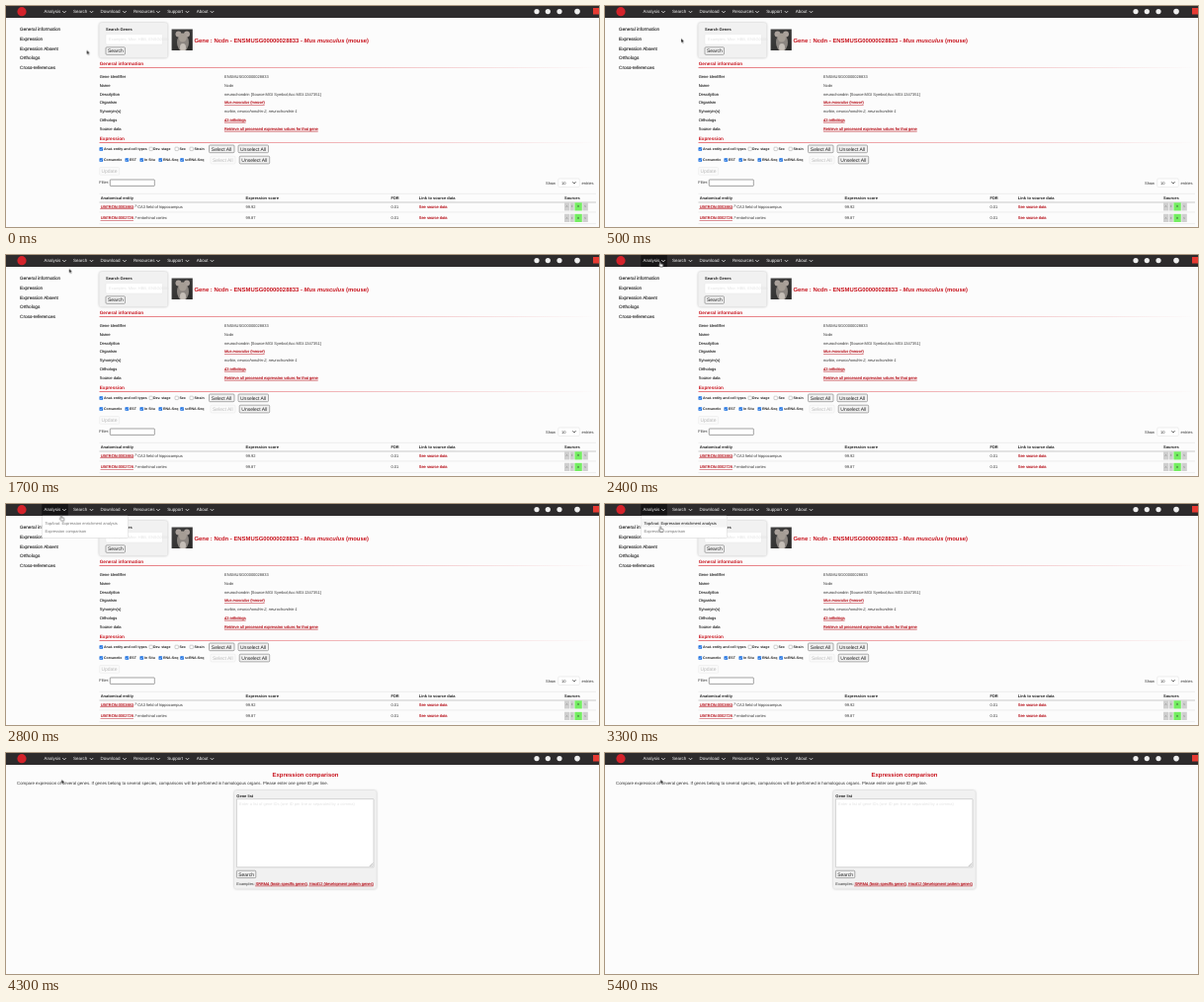
Recreate the animation shown at these times as an HTML page. Size 600x224 px, loop 6000 ms.

```html
<!DOCTYPE html>
<html lang="en">
<head>
<meta charset="utf-8">
<title>Gene page to expression comparison</title>
<style>
html, body { margin: 0; width: 100%; height: 100%; overflow: hidden; background: #fcfcfc; }
svg { display: block; width: 100%; height: 100%; }
text { font: 4px "Liberation Sans", Arial, sans-serif; fill: #333; text-rendering: geometricPrecision; white-space: pre; }
.nav text { font-size: 4.5px; fill: #f2f2f2; }
.side text { font-size: 4.7px; fill: #222; stroke: #222; stroke-width: .1; }
.label text { font-size: 4.05px; fill: #222; stroke: #222; stroke-width: .08; }
.bold, .checks text { font-weight: bold; fill: #222; }
.checks text { font-size: 3.55px; }
.title { font-size: 5.9px; font-weight: bold; fill: #c8141e; }
.head { font-size: 4.7px; font-weight: bold; fill: #c8141e; }
.link { font-size: 3.95px; fill: #b5101a; stroke: #b5101a; stroke-width: .12; }
.under { text-decoration: underline .5px; text-underline-offset: .3px; }
.italic { font-style: italic; }
.btn { font-size: 5px; fill: #222; }
.off { fill: #bbb; }
.hint { fill: #e2e2e2; }
.line { stroke: #ddd; stroke-width: .5; }
.box { fill: #f1f1f1; stroke: #777; stroke-width: .6; }
.pale { fill: #fafafa; stroke: #e6e6e6; stroke-width: .5; }
.field { fill: #fff; stroke: #888; stroke-width: .5; }
.panel { fill: #f1f1f1; filter: drop-shadow(0 .5px 1.3px #0004); }
.chev { fill: none; stroke: #f2f2f2; stroke-width: .8; }
.tiny { font-size: 3px; fill: #888; }

.gene, .compare, .menu, .arrow, .hand, .item, .row { animation: 6s step-end infinite; }
.gene { animation-name: gene; }
.compare { animation-name: compare; }
.menu { animation-name: menu; }
.arrow { animation-name: arrow; }
.hand { animation-name: hand; }
.item { fill: #777; }
.row { fill: #f4f4f4; }
.item.first { animation-name: first; }
.item.second { animation-name: second; }
.row.first { animation-name: row1; }
.row.second { animation-name: row2; }
.cursor { animation: move 6s infinite; }
@keyframes gene { 0% { opacity: 1 } 71.66%, 100% { opacity: 0 } }
@keyframes compare { 0% { opacity: 0 } 71.66%, 100% { opacity: 1 } }
@keyframes menu { 0% { opacity: 0 } 43.32% { opacity: 1 } 71.66%, 100% { opacity: 0 } }
@keyframes arrow { 0% { opacity: 1 } 33.32% { opacity: 0 } 71.66%, 100% { opacity: 1 } }
@keyframes hand { 0% { opacity: 0 } 33.32% { opacity: 1 } 71.66%, 100% { opacity: 0 } }
@keyframes first { 0% { fill: #777 } 48.32% { fill: #111 } 61.66%, 100% { fill: #777 } }
@keyframes second { 0% { fill: #777 } 61.66%, 100% { fill: #111 } }
@keyframes row1 { 0% { opacity: 0 } 48.32% { opacity: 1 } 61.66%, 100% { opacity: 0 } }
@keyframes row2 { 0% { opacity: 0 } 61.66%, 100% { opacity: 1 } }
@keyframes move {
  0% { transform: translate(81.6px, 44.6px); animation-timing-function: steps(10) }
  16.66% { transform: translate(72.2px, 20.8px); animation-timing-function: steps(14) }
  39.99% { transform: translate(55.3px, 6.6px); animation-timing-function: steps(2) }
  43.32% { transform: translate(55.3px, 7px); animation-timing-function: steps(7) }
  54.99% { transform: translate(55.6px, 22.8px); animation-timing-function: steps(9) }
  69.99%, 100% { transform: translate(56.2px, 26.8px) }
}
</style>
</head>
<body>
<svg viewBox="0 0 600 224">
<defs>
  <path id="chev" class="chev" d="M-1.7-.9 0 .8 1.7-.9"/>
  <g id="on"><rect width="3.6" height="3.6" rx=".6" fill="#1a6fe0"/><path d="M.8 1.8l.8.8L2.9 1" fill="none" stroke="#fff" stroke-width=".5"/></g>
  <rect id="empty" width="3.4" height="3.4" rx=".6" fill="#fff" stroke="#888" stroke-width=".4"/>
  <path id="out" d="M0 2.6 2.4.2M.9.2H2.4V1.7" fill="none" stroke="#777" stroke-width=".45"/>
  <g id="cells">
    <path d="M0 0h5v8.2H0zM5.6 0h4.2v8.2H5.6zM18.4 0h5.4v8.2h-5.4z" fill="#cfcfcf"/>
    <rect x="10.4" width="7.4" height="8.2" fill="#74ee62"/>
    <text class="tiny" x="1.5" y="5.1">A</text>
    <text class="tiny" x="6.7" y="5.1">E</text>
    <text class="tiny" x="13" y="5.1" style="fill:#333">R</text>
    <text class="tiny" x="20.1" y="5.1">S</text>
  </g>
  <linearGradient id="fade"><stop stop-color="#dc3a42"/><stop offset="1" stop-color="#fcfcfc"/></linearGradient>
  <linearGradient id="fur" x2="1" y2="1"><stop stop-color="#444"/><stop offset="1" stop-color="#292827"/></linearGradient>
  <clipPath id="frame"><rect x="167.6" y="23.5" width="21.2" height="21.4"/></clipPath>
</defs>

<rect width="600" height="224" fill="#fcfcfc"/>

<g class="gene">
  <g class="side">
    <text x="14" y="24.8">General information</text>
    <text x="14" y="34.6">Expression</text>
    <text x="14" y="44.5">Expression Absent</text>
    <text x="14" y="54.2">Orthologs</text>
    <text x="14" y="63.9">Cross-references</text>
  </g>

  <rect class="panel" x="94.3" y="17" width="69.2" height="35.5" rx="2.5"/>
  <text class="bold" x="101" y="25.4">Search Genes</text>
  <rect x="101" y="28.5" width="57.5" height="10.5" rx="1" fill="#fff" stroke="#e4e4e4" stroke-width=".5"/>
  <text class="hint" x="104" y="35.2">Examples: Mtor, HBB, ENSG0000</text>
  <rect class="box" x="101" y="41.8" width="19.5" height="7.5" rx="1"/>
  <text class="btn" x="103" y="47.3">Search</text>

  <g clip-path="url(#frame)">
    <rect x="167" y="23" width="22" height="22" fill="url(#fur)"/>
    <ellipse cx="179" cy="37" rx="6" ry="9" fill="#8b8580"/>
    <circle cx="174.5" cy="28.5" r="3" fill="#aaa19b"/>
    <circle cx="183" cy="28.5" r="3" fill="#aaa19b"/>
    <ellipse cx="178.8" cy="32" rx="4" ry="4.5" fill="#a59d95"/>
    <ellipse cx="179" cy="42" rx="3" ry="4" fill="#c5beb7"/>
  </g>
  <text class="title" x="190.5" y="37.3">Gene : Ncdn - ENSMUSG00000028833 - <tspan class="italic">Mus musculus</tspan> (mouse)</text>

  <text class="head" x="94.7" y="60.4">General information</text>
  <rect x="94.5" y="62.3" width="502.5" height=".7" fill="url(#fade)"/>
  <g class="label">
    <text x="94.7" y="73.4">Gene identifier</text>
    <text x="94.7" y="82">Name</text>
    <text x="94.7" y="90.6">Description</text>
    <text x="94.7" y="99.2">Organism</text>
    <text x="94.7" y="108">Synonym(s)</text>
    <text x="94.7" y="116.9">Orthologs</text>
    <text x="94.7" y="125.9">Source data</text>
  </g>
  <text x="221" y="73.4">ENSMUSG00000028833</text>
  <text x="221" y="82">Ncdn</text>
  <text x="221" y="90.6">neurochondrin [Source:MGI Symbol;Acc:MGI:1347351]</text>
  <text class="link under" x="221" y="99.2"><tspan class="italic">Mus musculus</tspan> (mouse)</text>
  <text class="italic" x="221" y="108">norbin, neurochondrin-2, neurochondrin-1</text>
  <text class="link under" x="221" y="116.9">43 orthologs</text>
  <text class="link under" x="221" y="125.9">Retrieve all processed expression values for that gene</text>

  <text class="head" x="94.7" y="136.2">Expression</text>
  <rect x="94.5" y="138" width="502.5" height=".7" fill="url(#fade)"/>
  <g class="checks">
    <use href="#on" x="94.5" y="143.2"/><text x="99" y="146.2">Anat. entity and cell types</text>
    <use href="#empty" x="145" y="143.2"/><text x="149" y="146.2">Dev. stage</text>
    <use href="#empty" x="171" y="143.2"/><text x="175.5" y="146.2">Sex</text>
    <use href="#empty" x="186" y="143.2"/><text x="190.5" y="146.2">Strain</text>
    <use href="#on" x="94.5" y="154.2"/><text x="99" y="157.3">Corvanetix</text>
    <use href="#on" x="120.5" y="154.2"/><text x="125" y="157.3">EST</text>
    <use href="#on" x="135.5" y="154.2"/><text x="140" y="157.3">In Situ</text>
    <use href="#on" x="154.5" y="154.2"/><text x="159" y="157.3">RNA-Seq</text>
    <use href="#on" x="176.3" y="154.2"/><text x="181" y="157.3">scRNA-Seq</text>
  </g>
  <rect class="box" x="205.5" y="141" width="25.5" height="7.7" rx="1"/>
  <text class="btn" x="207.8" y="146.6">Select All</text>
  <rect class="box" x="235" y="141" width="30.5" height="7.7" rx="1"/>
  <text class="btn" x="237" y="146.6">Unselect All</text>
  <rect class="pale" x="207" y="152.2" width="25" height="7.7" rx="1"/>
  <text class="btn off" x="209" y="157.8">Select All</text>
  <rect class="box" x="236.2" y="152.2" width="30.5" height="7.7" rx="1"/>
  <text class="btn" x="238.3" y="157.8">Unselect All</text>
  <rect class="pale" x="94.7" y="163.6" width="20" height="7.7" rx="1"/>
  <text class="btn off" x="96.4" y="169.2">Update</text>

  <text x="94.2" y="180.3">Filter:</text>
  <rect class="field" x="105.3" y="176" width="45" height="6.4" rx=".5" style="stroke:#444"/>
  <text x="546" y="180.6">Show</text>
  <rect class="field" x="558.8" y="175" width="21.5" height="8.4" rx="1" style="stroke:#ddd"/>
  <text x="562" y="180.8">10</text>
  <use href="#chev" x="575" y="179.2" style="filter:invert(.8)"/>
  <text x="582.5" y="180.6">entries</text>

  <path class="line" d="M94.5 190.3H597M94.5 208.9H597M94.5 220.7H597"/>
  <path d="M94.5 199H597" stroke="#999" stroke-width=".5"/>
  <text class="bold" x="95.7" y="196">Anatomical entity</text>
  <text class="bold" x="242.5" y="196">Expression score</text>
  <text class="bold" x="389.5" y="196">FDR</text>
  <text class="bold" x="417.8" y="196">Link to source data</text>
  <text class="bold" x="565" y="196">Sources</text>
  <text class="link under" x="95.7" y="204.6">UBERON:0003883</text>
  <use href="#out" x="129.6" y="201.6"/><text x="133.2" y="204.6">CA3 field of hippocampus</text>
  <text x="242.5" y="204.6">99.92</text><text x="389.5" y="204.6">0.01</text>
  <text class="link" x="417.8" y="204.6">See source data</text>
  <use href="#cells" x="565" y="199.3"/>
  <text class="link under" x="95.7" y="216.4">UBERON:0002728</text>
  <use href="#out" x="129.6" y="213.4"/><text x="133.2" y="216.4">entorhinal cortex</text>
  <text x="242.5" y="216.4">99.87</text><text x="389.5" y="216.4">0.01</text>
  <text class="link" x="417.8" y="216.4">See source data</text>
  <use href="#cells" x="565" y="210.8"/>
</g>

<g class="compare">
  <text class="title" x="303" y="23.6" text-anchor="middle">Expression comparison</text>
  <text x="11" y="32.4" style="font-size:4.35px">Compare expression of several genes. If genes belong to several species, comparisons will be performed in homologous organs. Please enter one gene ID per line.</text>
  <rect class="panel" x="231" y="38" width="143.8" height="99.8" rx="2"/>
  <text class="bold" x="233.3" y="44.7">Gene list</text>
  <rect class="field" x="233.4" y="46.6" width="138.6" height="69.2" rx=".5" style="stroke:#aaa"/>
  <path d="M367.8 115l3.4-3.4M369.6 115l1.6-1.6" stroke="#777" stroke-width=".5"/>
  <text class="hint" x="236" y="53.4">Enter a list of gene IDs (one ID per line or separated by a comma)</text>
  <rect class="box" x="233.4" y="119.2" width="19.4" height="7.4" rx="1"/>
  <text class="btn" x="235.2" y="124.7">Search</text>
  <text x="233.3" y="133.7" style="font-size:3.95px">Examples: <tspan class="link under" x="252.5">SRRM4 (brain specific genes)</tspan>, <tspan class="link under" x="306.8">Hoxd12 (development pattern genes)</tspan></text>
</g>

<g class="nav">
  <rect width="600" height="12" fill="#2d2b2c"/>
  <rect class="hand" x="36.3" width="26.5" height="12" fill="#161516"/>
  <circle cx="16" cy="5.7" r="4.6" fill="#d3222a"/>
  <text x="38.5" y="7.3">Analysis</text><use href="#chev" x="59" y="6"/>
  <text x="68" y="7.3">Search</text><use href="#chev" x="86.5" y="6"/>
  <text x="95.5" y="7.3">Download</text><use href="#chev" x="120" y="6"/>
  <text x="129" y="7.3">Resources</text><use href="#chev" x="154" y="6"/>
  <text x="163.3" y="7.3">Support</text><use href="#chev" x="183.5" y="6"/>
  <text x="192.8" y="7.3">About</text><use href="#chev" x="208.5" y="6"/>
  <g fill="#eee">
    <circle cx="537" cy="5.6" r="2.6"/><circle cx="548.3" cy="5.6" r="2.6"/>
    <circle cx="560" cy="5.6" r="2.6"/><circle cx="578" cy="5.6" r="2.8"/>
  </g>
  <rect x="594" y="2" width="6" height="6.5" fill="#e63a32"/>
</g>

<g class="menu">
  <rect x="36.3" y="12" width="87.4" height="22.6" rx="1" fill="#fff" stroke="#ccc" stroke-width=".5"/>
  <rect class="row first" x="36.5" y="15" width="87" height="8.5"/>
  <rect class="row second" x="36.5" y="23.7" width="87" height="8.5"/>
  <text class="item first" x="39.5" y="20.7">TopAnat: Expression enrichment analysis</text>
  <text class="item second" x="39.5" y="29.4">Expression comparison</text>
</g>

<g class="cursor" stroke-linejoin="round">
  <path class="arrow" d="M0 0V4.6L1.1 3.6 1.8 5.2 2.6 4.9 1.9 3.3H3.4Z" fill="#111" stroke="#fff" stroke-width=".4"/>
  <path class="hand" d="M0 .4Q.5-.3 1 .4V2.2L3.3 2.7Q3.8 2.9 3.6 3.7L3.1 5.6H.6L-1 3.4Q-1 2.7 0 3.2Z" fill="#fff" stroke="#222" stroke-width=".5"/>
</g>
</svg>
</body>
</html>
```
